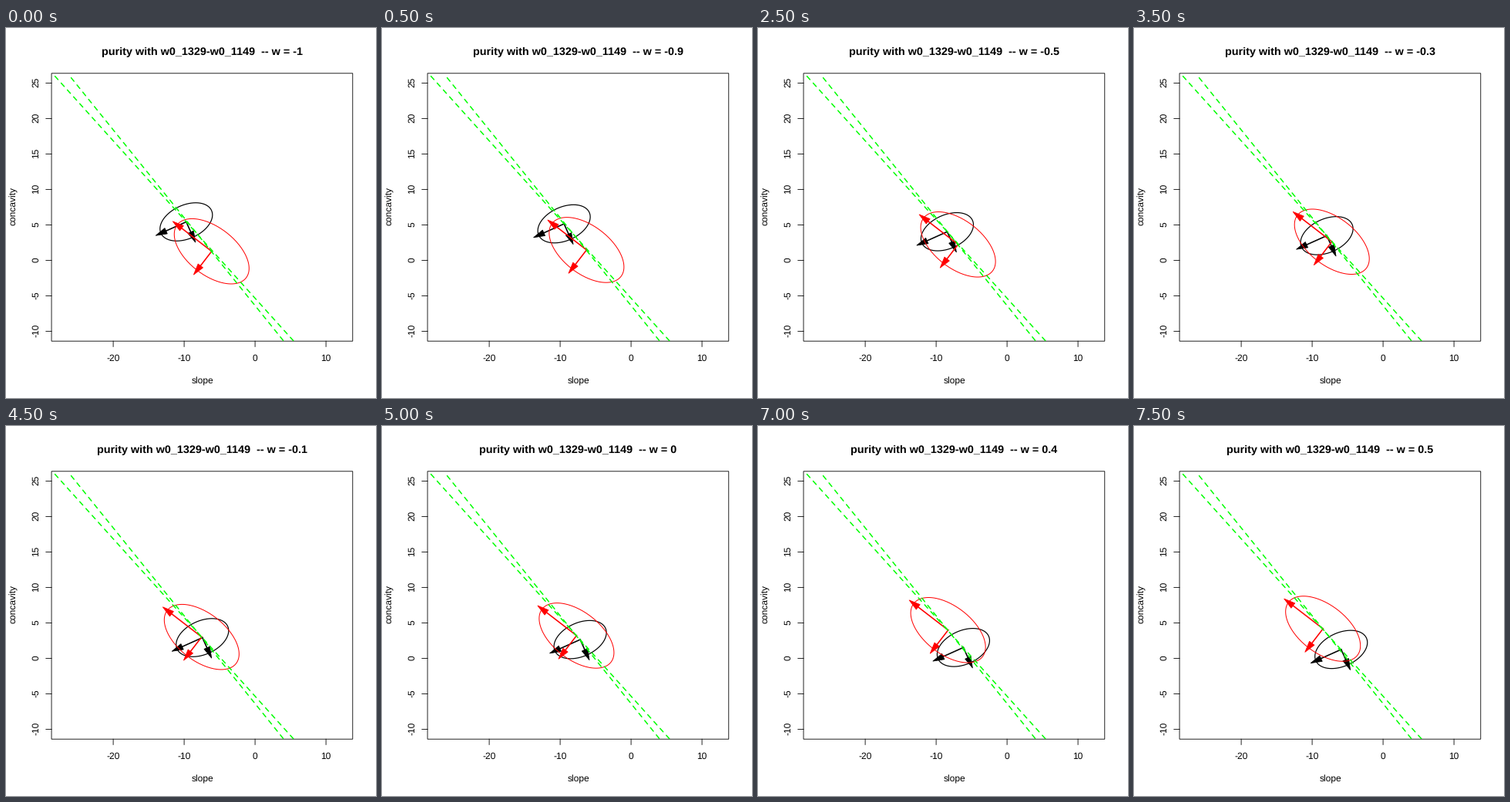
These frames come from a looping animation (480 px wide and 480 px high, 8 s). A matplotlib script:

```python
import numpy as np
import matplotlib.pyplot as plt
from matplotlib.animation import FuncAnimation
from matplotlib.patches import Rectangle

SIZE, DPI = 480, 72          # one point equals one pixel
LEFT, RIGHT, TOP, BOTTOM = 59.04, 449.76, 58.8, 406.2
FRAMES, INTERVAL = 16, 500

plt.rcParams.update({
    "font.family": "Liberation Sans",
    "font.size": 12,
    "text.hinting": "none",
})

fig = plt.figure(figsize=(SIZE / DPI, SIZE / DPI), dpi=DPI, facecolor="white")
ax = fig.add_axes([0, 0, 1, 1])
ax.set(xlim=(0, SIZE), ylim=(SIZE, 0))
ax.axis("off")


def px(v):
    return 323.1 + 9.2 * v


def py(v):
    return 301.4 - 9.2 * v


def label(x, y, s, **kw):
    return ax.text(x, y, s, ha="center", va="baseline",
                   rotation_mode="anchor", **kw)


def draw_axes():
    thin = dict(color="black", lw=0.85, snap=False)
    ax.add_patch(Rectangle((LEFT, TOP), RIGHT - LEFT, BOTTOM - TOP,
                           fill=False, **thin))
    for v in range(-20, 11, 10):
        ax.plot([px(v)] * 2, [BOTTOM, BOTTOM + 7.2], **thin)
        label(px(v), 432, str(v))
    for v in range(-10, 26, 5):
        ax.plot([LEFT - 7.2, LEFT], [py(v)] * 2, **thin)
        label(42, py(v) - 0.8, str(v), rotation=90)
    label(254.6, 462, "slope")
    label(13, 231, "concavity", rotation=90)


# Triangular arrowhead centred on the origin, pointing along +x
HEAD = np.array([(7.3, 0), (-7.3, 4), (-7.3, -4)])
TURN = np.linspace(0, 2 * np.pi, 200)


class Spread:
    """Ellipse with its two principal axes, sliding along a straight path."""

    def __init__(self, color, origin, speed, axis, radii, lw, z):
        self.origin, self.speed = np.array(origin), np.array(speed)
        a, b = radii
        u = np.array(axis) / np.hypot(*axis)
        v = np.array([u[1], -u[0]])
        self.ring = (a * np.outer(np.cos(TURN), u)
                     + b * np.outer(np.sin(TURN), v))
        self.curve, = ax.plot([], [], color=color, lw=lw, zorder=z)
        self.arrows = []
        for d, r in ((u, a), (v, b)):
            shaft, = ax.plot([], [], color=color, lw=1.6, zorder=z + 0.1)
            head, = ax.fill([0], [0], fc=color, ec=color, lw=0.8,
                            joinstyle="round", zorder=z + 0.2)
            rot = np.array([d, [-d[1], d[0]]])
            self.arrows.append((shaft, head, r * d, HEAD @ rot))

    def move(self, w):
        c = self.origin + w * self.speed
        self.curve.set_data(*(c + self.ring).T)
        for shaft, head, reach, shape in self.arrows:
            shaft.set_data(*np.array([c, c + reach]).T)
            head.set_xy(c + reach + shape)


def path_line(start, end):
    line, = ax.plot(*zip(start, end), color="#00ff00", lw=1.5,
                    ls=(0, (4, 4)), dash_capstyle="round", zorder=5)
    line.set_clip_path(Rectangle((LEFT, TOP), RIGHT - LEFT, BOTTOM - TOP,
                                 transform=ax.transData))


draw_axes()
path_line((63.5, 62.5), (382.1, 416))
path_line((84.5, 64.5), (368.2, 416))
title = label(254.2, 35, "", fontsize=14.4, weight="bold")

spreads = [
    Spread("black", (257.1, 277.1), (23.3, 25.6),
           (-39, 17.5), (36, 21.8), 1.2, 3),
    Spread("red", (252.4, 271.9), (-14.4, -17.8),
           (-50, -38.5), (56.4, 31), 1.0, 4),
]


def update(i):
    w = (i - 10) / 10
    title.set_text(f"purity with w0_1329-w0_1149  -- w = {w:g}")
    for s in spreads:
        s.move(w)
    return []


anim = FuncAnimation(fig, update, frames=FRAMES, interval=INTERVAL,
                     repeat=True, repeat_delay=0, blit=False)
plt.show()
```
